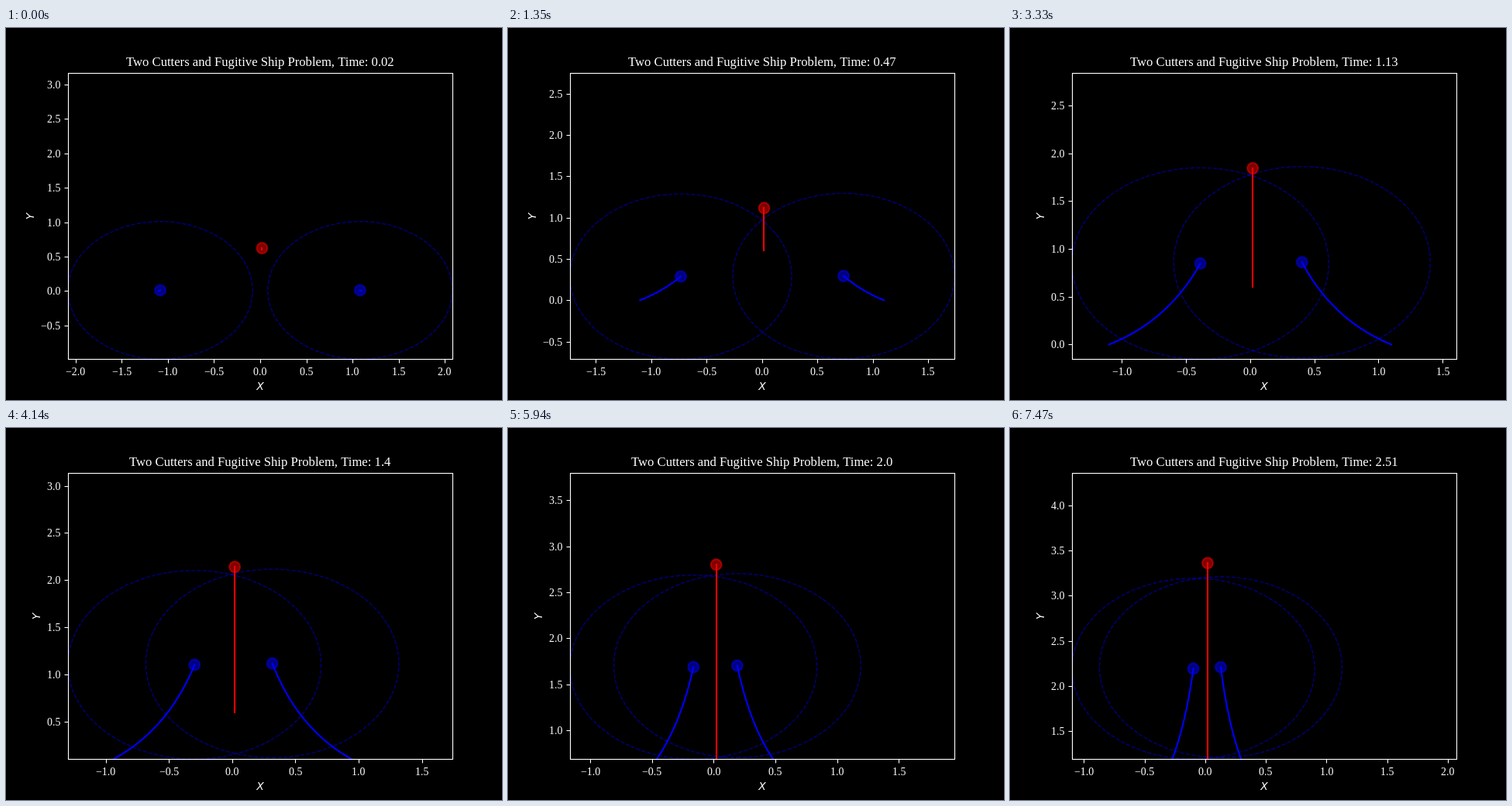
Animation of 640 by 480 pixels, one loop 7500 ms. Source, as an HTML page with a canvas:

```html
<!DOCTYPE html>
<html lang="en">
<head>
<meta charset="utf-8">
<title>Pursuit plot</title>
<style>
  html, body { margin: 0; width: 100%; height: 100%; overflow: hidden; background: #000; }
  canvas { display: block; }
</style>
</head>
<body>
<canvas id="plot" width="640" height="480"></canvas>
<script>
const ctx = document.getElementById('plot').getContext('2d');
const STEP_MS = 30, STEPS = 250, DT = 0.01;
const PT = 100 / 72;                       // plot points to pixels
const BOX = { left: 80, top: 57.6, right: 576, bottom: 427.2 };
const SERIF = '"Liberation Serif", "Times New Roman", serif';
const SANS = '"DejaVu Sans", sans-serif';
const RED = '#f00', BLUE = '#00f';

// Pure pursuit: both cutters always steer at the ship.
function simulate() {
  const ship = [[0.02, 0.6]], port = [[-1.1, 0]], starboard = [[1.1, 0]];
  for (let k = 0; k <= STEPS; k++) {
    const target = ship[k];
    for (const path of [port, starboard]) {
      const [x, y] = path[k];
      const dx = target[0] - x, dy = target[1] - y, d = Math.hypot(dx, dy);
      path.push([x + DT * dx / d, y + DT * dy / d]);
    }
    ship.push([target[0], target[1] + 1.1 * DT]);
  }
  return { ship, port, starboard };
}
const { ship, port, starboard } = simulate();

const snap = v => Math.floor(v + 0.5) + 0.5;

function segment(x1, y1, x2, y2) {
  ctx.beginPath();
  ctx.moveTo(x1, y1);
  ctx.lineTo(x2, y2);
  ctx.stroke();
}

function getView(points) {
  const xs = points.map(p => p[0]), ys = points.map(p => p[1]);
  const left = Math.min(...xs) - 1, bottom = Math.min(...ys) - 1;
  const size = Math.max(Math.max(...xs) + 1 - left, Math.max(...ys) + 1 - bottom);
  const sx = (BOX.right - BOX.left) / size, sy = (BOX.bottom - BOX.top) / size;
  return {
    left, bottom, size, sx, sy,
    x: v => BOX.left + (v - left) * sx,
    y: v => BOX.bottom - (v - bottom) * sy
  };
}

function drawRange([x, y], view) {
  ctx.globalAlpha = 0.5;
  ctx.strokeStyle = BLUE;
  ctx.lineWidth = PT;
  ctx.lineCap = 'butt';
  ctx.setLineDash([3.7 * PT, 1.6 * PT]);
  ctx.beginPath();
  ctx.ellipse(view.x(x), view.y(y), view.sx, view.sy, 0, Math.PI / 2, -1.5 * Math.PI, true);
  ctx.stroke();
  ctx.setLineDash([]);
  ctx.globalAlpha = 1;
}

function drawDot([x, y], color, view) {
  ctx.globalAlpha = 0.5;
  ctx.fillStyle = ctx.strokeStyle = color;
  ctx.lineWidth = 1.5 * PT;
  ctx.beginPath();
  ctx.arc(view.x(x), view.y(y), 5 * PT, 0, 2 * Math.PI);
  ctx.fill();
  ctx.stroke();
  ctx.globalAlpha = 1;
}

function drawTrail(path, last, color, view, place = v => v) {
  ctx.strokeStyle = color;
  ctx.lineWidth = 1.5 * PT;
  ctx.lineCap = 'square';
  ctx.lineJoin = 'round';
  ctx.beginPath();
  for (let k = 0; k <= last; k++) {
    ctx.lineTo(place(view.x(path[k][0])), place(view.y(path[k][1])));
  }
  ctx.stroke();
}

function ticks(from, size) {
  const list = [];
  for (let n = Math.ceil(from * 2); n <= (from + size) * 2; n++) list.push(n / 2);
  return list;
}

const tickLabel = v => (v < 0 ? '\u2212' : '') + Math.abs(v).toFixed(1);

function drawAxes(view) {
  ctx.strokeStyle = ctx.fillStyle = '#fff';
  ctx.lineWidth = 0.8 * PT;
  ctx.lineCap = 'butt';
  ctx.lineJoin = 'miter';
  const l = snap(BOX.left), t = snap(BOX.top), r = snap(BOX.right), b = snap(BOX.bottom);
  ctx.strokeRect(l, t, r - l, b - t);

  ctx.font = `${10 * PT}px ${SERIF}`;
  ctx.textAlign = 'left';
  for (const v of ticks(view.left, view.size)) {
    const x = view.x(v), text = tickLabel(v);
    segment(snap(x), b, snap(x), b + 5);
    ctx.fillText(text, Math.round(x - ctx.measureText(text).width / 2), 448);
  }
  for (const v of ticks(view.bottom, view.size)) {
    const y = view.y(v), text = tickLabel(v);
    segment(l - 5, snap(y), l, snap(y));
    ctx.fillText(text, Math.round(70.28 - ctx.measureText(text).width), Math.round(y + 5));
  }

  ctx.font = `italic ${10 * PT}px ${SANS}`;
  ctx.textAlign = 'center';
  ctx.fillText('X', 328, 467);
  ctx.save();
  // Negative tick labels are wider and push the axis name outwards.
  ctx.translate(view.bottom <= -0.5 ? 36 : 44, 243);
  ctx.rotate(-Math.PI / 2);
  ctx.fillText('Y', 0, 0);
  ctx.restore();
}

function drawTitle(k) {
  const time = k % 100 ? String(k / 100) : (k / 100).toFixed(1);
  const text = `Two Cutters and Fugitive Ship Problem, Time: ${time}`;
  ctx.font = `${12 * PT}px ${SERIF}`;
  ctx.textAlign = 'left';
  ctx.fillStyle = '#fff';
  ctx.fillText(text, Math.round(328 - ctx.measureText(text).width / 2), 49);
}

function draw(k) {
  const view = getView([ship[k], port[k], starboard[k]]);
  ctx.fillStyle = '#000';
  ctx.fillRect(0, 0, 640, 480);

  ctx.save();
  ctx.beginPath();
  ctx.rect(80, 58, 496, 369);
  ctx.clip();
  drawRange(port[k], view);
  drawRange(starboard[k], view);
  drawDot(port[k], BLUE, view);
  drawDot(starboard[k], BLUE, view);
  drawDot(ship[k], RED, view);
  drawTrail(port, k, BLUE, view);
  drawTrail(starboard, k, BLUE, view);
  drawTrail(ship, k, RED, view, Math.round);
  ctx.restore();

  drawAxes(view);
  drawTitle(k);
}

const start = performance.now();
function tick() {
  const step = Math.floor((performance.now() - start) / STEP_MS) % STEPS;
  draw(step + 2);
  requestAnimationFrame(tick);
}
tick();
</script>
</body>
</html>
```
